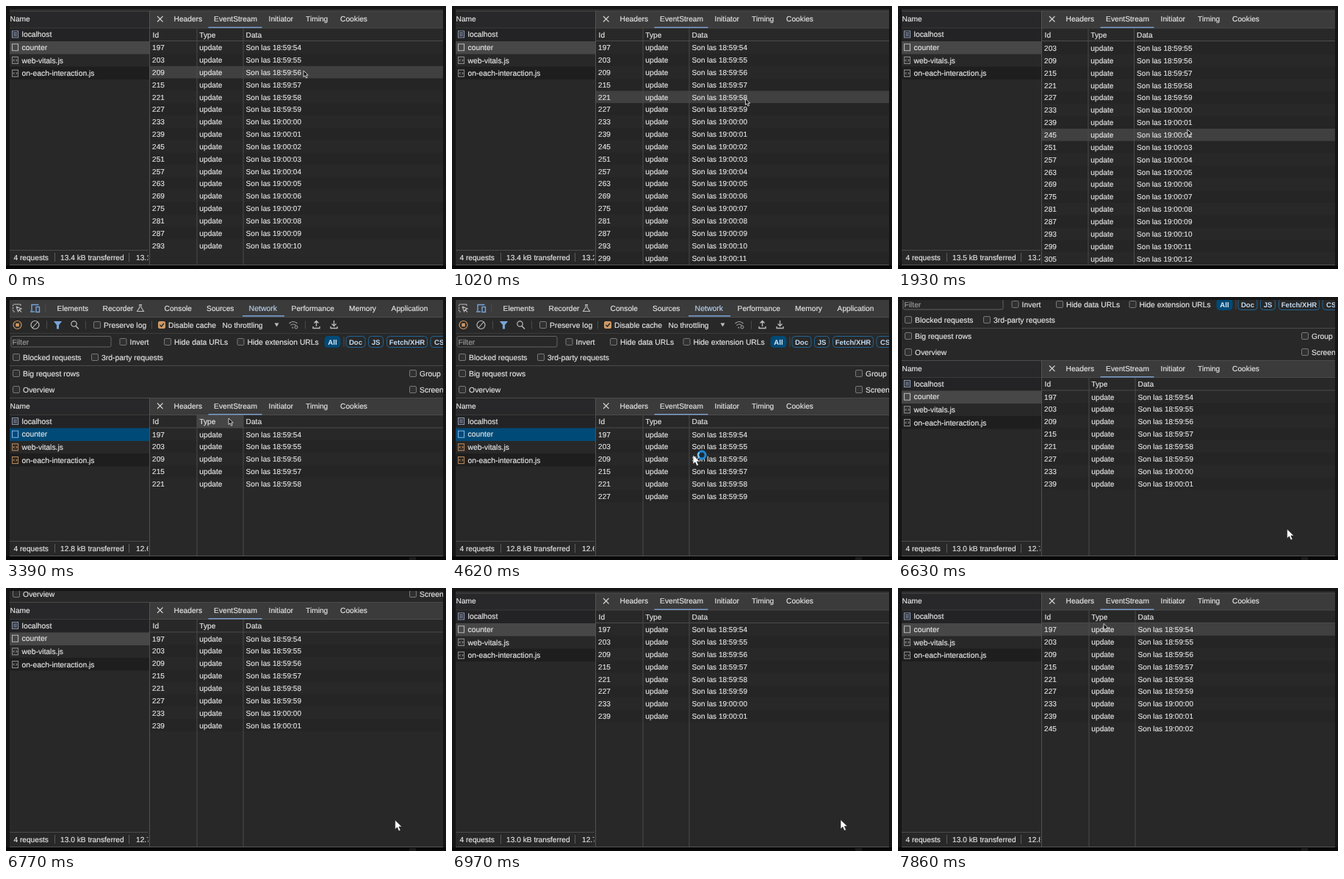
Animation, 599 px wide and 358 px high, one loop 7990 ms. Source, as an HTML page:

```html
<!DOCTYPE html>
<html lang="en">
<head>
<meta charset="utf-8">
<title>Event stream panel</title>
<style>
  html, body { margin: 0; width: 100%; height: 100%; overflow: hidden; background: #151515; }
  svg { display: block; width: 100vw; height: 100vh; }
  text { font: 10.2px "Liberation Sans", Arial, sans-serif; fill: #e4e4e4; stroke: #e4e4e4; stroke-width: .18px; text-rendering: geometricPrecision; white-space: pre; }
  .js { stroke: #858585; }
  .doc { stroke: #8c99b0; }
  .page { stroke: #b8b8b8; }
  .focused .js { stroke: #b08258; }
  .focused .page { stroke: #7fb2e6; }
  #picked { fill: #474747; }
  .focused #picked { fill: #004a77; }
</style>
</head>
<body>
<svg id="stage" viewBox="0 0 599 358">
  <defs><clipPath id="view"><rect x="5" y="4" width="590" height="349"/></clipPath>
  <clipPath id="foot"><rect x="5" y="332" width="188.5" height="21"/></clipPath></defs>
</svg>
<script>
const NS = 'http://www.w3.org/2000/svg';
const LOOP = 7990, ROW = 16.85, FIRST = 187, FULL = 130.5;
const LINE = '#4b4b4b', BODY = '#282828', BAR = '#3b3b3b', ICON = '#bdbdbd', BLUE = '#78a4d8', ORANGE = '#cf9a66';

function add(parent, tag, attrs = {}, content) {
  const el = document.createElementNS(NS, tag);
  for (const k in attrs) el.setAttribute(k, attrs[k]);
  if (content !== undefined) el.textContent = content;
  parent.append(el);
  return el;
}
const rect = (p, x, y, width, height, fill, more) => add(p, 'rect', { x, y, width, height, fill, ...more });
const text = (p, x, y, s, more) => add(p, 'text', { x: x - .4, y: y + 3.6, ...more }, s);
const path = (p, d, stroke, more) => add(p, 'path', { d, stroke, fill: 'none', 'stroke-width': 1.1, ...more });
const show = (el, on) => el.setAttribute('display', on ? 'inline' : 'none');
const size = px => ({ style: `font-size:${px}px` });
const tint = (color, more = '') => ({ style: `fill:${color};stroke:${color};${more}` });

const stage = document.getElementById('stage');
rect(stage, 0, 353, 599, 5, '#080808');
const smudge = rect(stage, 549, 354, 9, 4, '#1b1b1b');
const view = add(stage, 'g', { 'clip-path': 'url(#view)' });
rect(view, 5, 4, 590, 349, BODY);
const page = add(view, 'g');

function check(x, y, label, on) {
  rect(page, x - 4.5, y - 4.5, 9, 9, on ? ORANGE : '#303030', { rx: 1.5, stroke: on ? ORANGE : '#787878' });
  if (on) path(page, `M${x - 2.5} ${y}l2 2.2l3.5 -4.5`, '#282828', { 'stroke-width': 1.4 });
  text(page, x + 9.5, y, label, size(10.35));
}
const divider = (x, y, h = 11) => rect(page, x, y - h / 2, 1, h, LINE);

function toolbar() {
  rect(page, 5, 4, 590, 23, BAR);
  rect(page, 5, 27, 590, 1, LINE);
  path(page, 'M12 20h-2.500v-10h10.500v3M12 10h8', ICON, { 'stroke-dasharray': '2 1.300' });
  path(page, 'M14 13l7 3-3 1.200 3 3.500M14 13l2.500 7 1.500-2.800', ICON);
  path(page, 'M35 19v-8.500h9.500M33 20h6M41 13.500h4.500v7h-4.500z', BLUE, { 'stroke-width': 1.4 });
  divider(53, 15.500);
  const tabs = [[70, 'Elements'], [132, 'Recorder'], [216, 'Console'], [273.5, 'Sources'], [389, 'Performance'], [467.5, 'Memory'], [525, 'Application']];
  for (const [x, s] of tabs) text(page, x, 15, s);
  text(page, 331, 15, 'Network', tint('#b4cdea', 'font-size:10.5px'));
  rect(page, 322, 25, 57, 1.5, BLUE);
  path(page, 'M181 10.500h4M182 10.500v3.500l-3.500 5.500h9l-3.500-5.500v-3.500', ICON);

  add(page, 'circle', { cx: 15.5, cy: 38, r: 5.5, fill: 'none', stroke: ORANGE, 'stroke-width': 1.2 });
  rect(page, 13.2, 35.7, 4.6, 4.6, ORANGE);
  add(page, 'circle', { cx: 39.5, cy: 38, r: 5.5, fill: 'none', stroke: ICON, 'stroke-width': 1.2 });
  path(page, 'M36 42l7-8', ICON);
  [55, 108, 198, 407].forEach(x => divider(x, 38));
  path(page, 'M66 33.500h9l-3.500 4.500v5h-2v-5z', BLUE, { fill: BLUE });
  add(page, 'circle', { cx: 92.5, cy: 36.5, r: 3.7, fill: 'none', stroke: ICON, 'stroke-width': 1.2 });
  path(page, 'M95 39.500l4 4', ICON, { 'stroke-width': 1.4 });
  check(124, 38, 'Preserve log');
  check(212, 38, 'Disable cache', true);
  text(page, 295, 38, 'No throttling');
  path(page, 'M365.500 35.500h6l-3 5z', 'none', { fill: ICON });
  path(page, 'M385.500 36q5.500-5 11 0M387.500 38.500q3.500-3 7 0M389.500 41l1.500 1.500', '#a5a5a5');
  add(page, 'circle', { cx: 395, cy: 41, r: 2, fill: 'none', stroke: '#a5a5a5' });
  const tray = 'v2.500h9v-2.500';
  path(page, `M418 40${tray}M422.500 40v-7.500M419.500 35.500l3-3 3 3`, ICON, { 'stroke-width': 1.3 });
  path(page, `M442 40${tray}M446.500 32v7.500M443.500 36.500l3 3 3-3`, ICON, { 'stroke-width': 1.3 });
  rect(page, 5, 49, 590, 1, '#3c3c3c');

  rect(page, 7, 53.5, 136, 14.5, BODY, { rx: 2, stroke: '#626262' });
  text(page, 9, 61, 'Filter', tint('#9a9a9a'));
  check(159.5, 61, 'Invert');
  check(220, 61, 'Hide data URLs');
  check(319.5, 61, 'Hide extension URLs');
  divider(459.5, 61, 14);
  const pills = [[434, 21, 'All', true], [463, 26, 'Doc'], [493.5, 20, 'JS'], [518.5, 55, 'Fetch/XHR'], [578, 30, 'CSS']];
  for (const [x, w, s, on] of pills) {
    rect(page, x, 53.5, w, 15, on ? '#004a77' : BODY, { rx: 4, stroke: on ? '#004a77' : '#1f6597' });
    const edge = s === 'CSS' ? { x: x + 5 } : { x: x + w / 2, 'text-anchor': 'middle' };
    const look = tint(on ? '#e2effb' : '#c3daf0', 'font-weight:700;font-size:9.6px;stroke-width:0');
    add(page, 'text', { ...edge, y: 64.5, ...look }, s);
  }
  check(14, 82, 'Blocked requests');
  check(121, 82, '3rd-party requests');
  rect(page, 5, 93, 590, 1, LINE);
  check(14, 104, 'Big request rows');
  check(554, 104, 'Group');
  check(14, 126, 'Overview');
  check(554, 126, 'Screenshots');
}

function fileList() {
  rect(page, 5, 137, 190, 23.5, '#28282a');
  text(page, 6, 148, 'Name');
  rect(page, 5, 160.5, 190, 18, '#232325');
  rect(page, 5, 178.5, 190, 17.5, '', { id: 'picked' });
  rect(page, 5, 213, 190, 17.5, '#1e1e1e');
  ['localhost', 'counter', 'web-vitals.js', 'on-each-interaction.js'].forEach((s, i) => {
    const y = 169 + i * 17.7;
    text(page, 22, y, s, size(10.35));
    const box = `M8.500 ${y - 4.5}h8v9h-8z`;
    if (i === 0) path(page, box + `M10 ${y - 2}h5M10 ${y}h5M10 ${y + 2}h5`, '', { class: 'doc' });
    else if (i === 1) path(page, box, '', { class: 'page' });
    else path(page, box + `M11.500 ${y - 1.5}l-1.500 1.500 1.500 1.500M13.500 ${y - 1.5}l1.500 1.500-1.500 1.500`, '', { class: 'js' });
  });
}

const rows = [];
let rowLayer, typeHover;
function events() {
  rowLayer = add(page, 'g');
  for (let i = 0; i < 19; i++) {
    const g = add(rowLayer, 'g'), y = FIRST + i * ROW;
    const back = rect(g, 196, y - ROW / 2, 399, ROW, BODY);
    const clock = new Date(Date.UTC(2000, 0, 1, 18, 59, 54 + i)).toISOString().slice(11, 19);
    text(g, 199.5, y, 197 + 6 * i, size(10.05));
    text(g, 263.7, y, 'update', { class: 'type', ...size(10.2) });
    text(g, 327, y, 'Son las ' + clock, { class: 'data', ...size(10.05) });
    rows.push({ g, back });
  }
  rect(page, 196, 137, 399, 23.5, BAR);
  rect(page, 196, 160.5, 399, 17.5, BODY);
  typeHover = rect(page, 260, 160.5, 63, 17.5, '#454545');
  rect(page, 196, 160, 399, 1, LINE);
  rect(page, 196, 177.5, 399, 1, LINE);
  rect(page, 5, 137, 590, 1, LINE);
  rect(page, 5, 160, 190, 1, '#3a3a3a');
  rect(page, 195, 137, 1, 400, '#525252');
  rect(page, 259.5, 161, 1, 400, LINE, { class: 'type' });
  rect(page, 322.5, 161, 1, 400, LINE, { class: 'data' });
  path(page, 'M206 144.500l7.500 7.500M213.500 144.500l-7.500 7.500', '#d5d5d5');
  const tabs = [[229, 'Headers'], [283.5, 'EventStream'], [358, 'Initiator'], [408.5, 'Timing'], [455.5, 'Cookies']];
  for (const [x, s] of tabs) text(page, x, 148, s);
  rect(page, 275.5, 159, 73, 1.5, '#7c9ccb');
  text(page, 200, 169.5, 'Id');
  text(page, 263.7, 169.5, 'Type', { class: 'type' });
  text(page, 327, 169.5, 'Data', { class: 'data' });
}

toolbar();
fileList();
events();

const foot = add(view, 'g', { 'clip-path': 'url(#foot)' });
rect(foot, 5, 332, 190, 21, BODY);
rect(foot, 5, 332, 190, 1, LINE);
text(foot, 10.8, 342, '4 requests');
const sent = text(foot, 74.4, 342, '');
const loaded = text(foot, 177.4, 342, '');
rect(foot, 66, 336, 1, 12, '#5c5c5c');
rect(foot, 167, 336, 1, 12, '#5c5c5c');
rect(view, 5, 352, 590, 1, '#555');

const arrow = 'M0 0v12.500l2.900-2.700 2.200 5 2.300-1-2.200-4.900h4z';
const dark = path(view, arrow, '#e4e4e4', { fill: '#111', 'stroke-width': 1.3 });
const light = add(view, 'g');
path(light, arrow, '#222', { fill: '#fff', 'stroke-width': .6 });
const busy = add(light, 'g');
add(busy, 'circle', { cx: 12, cy: 0, r: 5, fill: '#1b2a36', stroke: '#1f86d0', 'stroke-width': 3 });
const spin = path(busy, 'M12 -5a5 5 0 0 1 5 5', '#8fd0ff', { 'stroke-width': 2 });

// time, visible events, kB transferred, kB of resources
const ticks = [
  [0, 17, '13.4', '13.1'], [450, 18, '13.4', '13.2'], [1450, 19, '13.5', '13.2'],
  [2130, 4, '12.7', '12.5'], [3390, 5, '12.8', '12.6'], [4270, 6, '12.8', '12.6'],
  [5200, 7, '12.9', '12.7'], [6220, 8, '13.0', '12.7'], [7240, 9, '13.0', '12.8']
];
const scrolls = [[0, FULL], [2130, 0], [6630, 51], [6700, 92], [6770, 118], [6840, FULL]];
// time, x, y of the pointer tip
const moves = [
  [0, 405, 88], [130, 405, 88], [880, 402, 108], [950, 401, 112], [1090, 398, 140], [1450, 398, 140],
  [1930, 394, 168], [2129, 394, 168], [2130, 303, 165], [3390, 303, 165], [4140, 340, 205],
  [4270, 332, 212], [4620, 328, 215], [5040, 385, 235], [5110, 385, 235], [5880, 440, 300],
  [5950, 445, 302], [6430, 529.7, 316], [6970, 529.7, 316], [7310, 302, 136], [7440, 300, 130],
  [7580, 291, 92], [7730, 289, 85], [7860, 280, 48.5], [LOOP, 280, 48.5]
];
const held = (table, t) => table.findLast(k => k[0] <= t);

function pointer(t) {
  const i = moves.findIndex(k => k[0] > t);
  const [t0, x0, y0] = moves[i - 1], [t1, x1, y1] = moves[i];
  const p = (t - t0) / (t1 - t0);
  return [x0 + (x1 - x0) * p, y0 + (y1 - y0) * p];
}

function draw(t) {
  const [, count, kb, res] = held(ticks, t);
  const top = held(scrolls, t)[1];
  const [x, y] = pointer(t);
  const narrow = count > 18;
  const lift = narrow ? 15.85 : 0;
  const white = t >= 4270 && t < 7180;

  stage.classList.toggle('focused', t >= 2130 && t < 5250);
  show(smudge, t >= 2130);
  page.setAttribute('transform', `translate(0 ${-top})`);
  rowLayer.setAttribute('transform', `translate(0 ${-lift})`);
  for (const [name, dx] of [['type', -1], ['data', -1.5]])
    for (const el of page.getElementsByClassName(name)) el.setAttribute('transform', `translate(${narrow ? dx : 0} 0)`);

  const over = white || y + top < 178 ? -1 : Math.floor((y + top + lift - FIRST) / ROW + .5);
  rows.forEach(({ g, back }, i) => {
    show(g, i < count);
    back.setAttribute('fill', i === over ? '#404040' : i % 2 ? '#252526' : BODY);
  });
  show(typeHover, !white && y + top > 160.5 && y + top < 178 && x > 260 && x < 323);

  sent.textContent = kb + ' kB transferred';
  loaded.textContent = res + ' kB resources';

  show(dark, !white);
  show(light, white);
  show(busy, t < 5040);
  dark.setAttribute('transform', `translate(${x} ${y}) scale(.68)`);
  light.setAttribute('transform', `translate(${x} ${y})`);
  spin.setAttribute('transform', `rotate(${t * .36} 12 0)`);
}

const start = performance.now();
function frame() {
  draw((performance.now() - start) % LOOP);
  requestAnimationFrame(frame);
}
frame();
</script>
</body>
</html>
```
